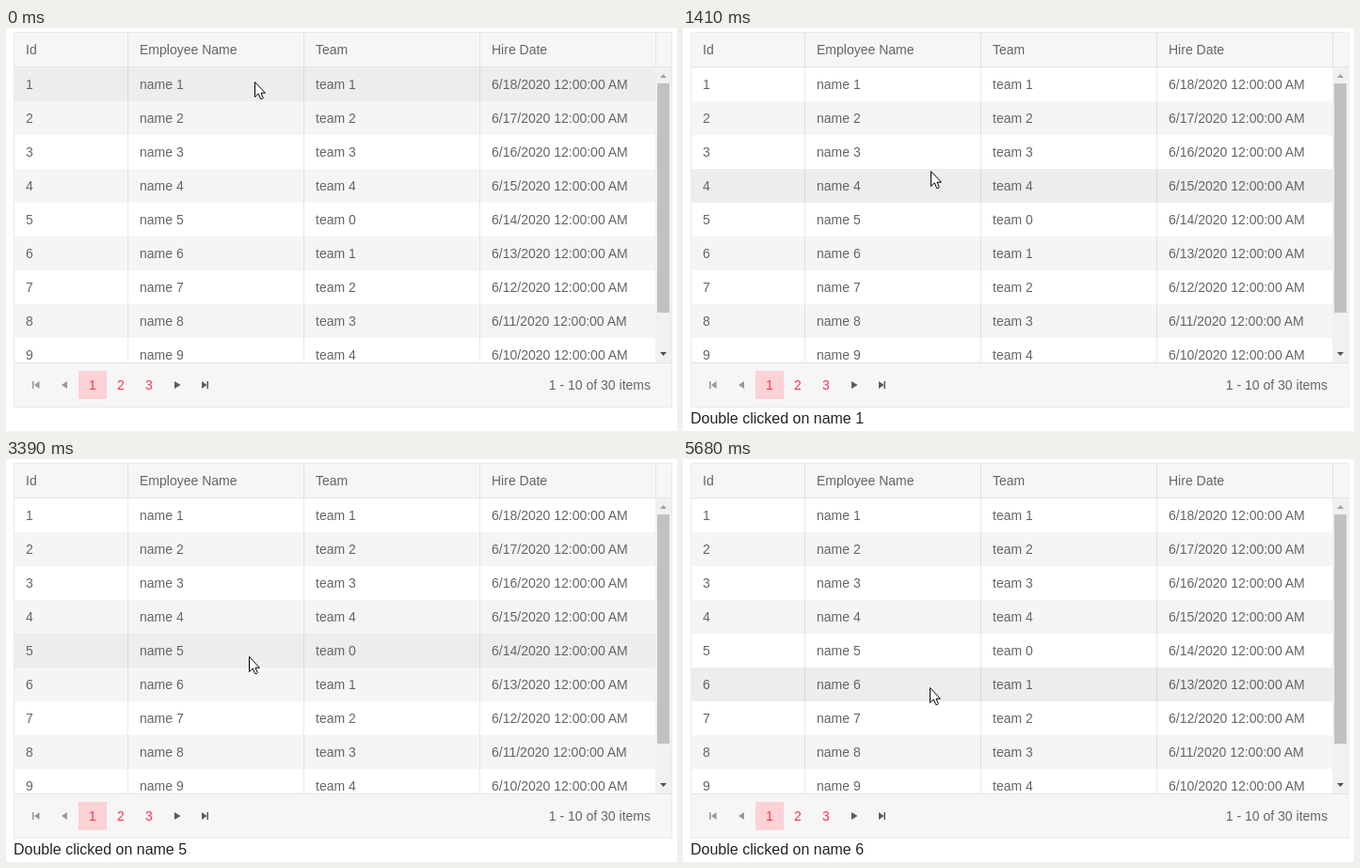
Animation of 713 by 429 pixels, one loop 7210 ms. Source, as an HTML page:

```html
<!DOCTYPE html>
<html lang="en">
<head>
<meta charset="utf-8">
<title>Grid double click</title>
<style>
  html, body { margin: 0; width: 100%; height: 100%; overflow: hidden; background: #fff; }
  svg { display: block; }
  text { font: 14px "Liberation Sans", Arial, sans-serif; fill: #656565; white-space: pre; }
  .page { fill: #ff3150; text-anchor: middle; }
  .info { text-anchor: end; }
  .line { fill: #000; fill-opacity: .08; }
  #message { font-size: 16px; fill: #212529; }
</style>
</head>
<body>
<svg width="713" height="429" viewBox="0 0 713 429">
  <defs><clipPath id="body"><rect x="9" y="42" width="681" height="314"/></clipPath></defs>
  <rect x="9" y="5" width="698" height="37" fill="#f6f6f6"/>
  <rect x="9" y="356" width="698" height="47" fill="#f6f6f6"/>
  <g id="rows" clip-path="url(#body)"></g>
  <g id="header"></g>
  <g id="lines"></g>

  <g id="scrollbar">
    <rect x="690" y="42" width="17" height="314" fill="#f1f1f1"/>
    <rect x="692" y="59" width="13" height="244" fill="#c1c1c1"/>
    <path d="M695 53h7l-3.5-4z" fill="#a3a3a3"/>
    <path d="M695 345h7l-3.5 4z" fill="#505050"/>
  </g>

  <g id="pager">
    <rect x="77" y="365" width="30" height="30" fill="#fbd2d5"/>
    <g fill="#5c5c5c">
      <path d="M28 376h1.5v8H28zM35.5 376v8l-5.5-4z" opacity=".6"/>
      <path d="M65 376v8l-6-4z" opacity=".6"/>
      <path d="M179 376v8l6.5-4z"/>
      <path d="M208 376v8l5.5-4zM213.5 376h1.5v8h-1.5z"/>
    </g>
    <text class="info" x="685" y="385">1 - 10 of 30 items</text>
  </g>

  <text id="message" x="8" y="421"></text>
  <g id="pointer">
    <path d="M.5.5V16.5L4.3 12.9 6.6 18.4H8.4L9.3 17.6 7 12.2H11.4Z" fill="#fff" stroke="#000"/>
    <circle id="click" r="12" fill="#ff0" fill-opacity=".47"/>
  </g>
</svg>
<script>
const LOOP = 7210, TICK = LOOP / 66, TICK_LEAD = 12;
const TOP = 42, ROW = 36;
const columns = [129, 316, 503, 690].map(right => right - 187);
columns[0] = 9;
const $ = id => document.getElementById(id);

const easeOut = power => u => 1 - (1 - u) ** power;
const smooth = u => u * u * (3 - 2 * u);

// Pointer strokes and double clicks are timed in ticks.
const home = { x: 264, y: 57 };
const strokes = [
  { from: 6, to: 9, x: 264, y: 93, ease: easeOut(1.4) },
  { from: 10, to: 12, x: 263, y: 113, ease: smooth },
  { from: 12, to: 14, x: 263, y: 161, ease: easeOut(2.4) },
  { from: 15, to: 17, x: 263, y: 166, ease: smooth },
  { from: 24, to: 27, x: 258, y: 210, ease: easeOut(2.4) },
  { from: 40, to: 47, x: 262, y: 243, ease: smooth }
];
const doubleClicks = [
  { press: 2, release: 3, report: 5 },
  { press: 18, release: 20, report: 20 },
  { press: 29, release: 31, report: 31 },
  { press: 50, release: 52, report: 52 }
];

function pointerAt(tick) {
  let { x, y } = home;
  for (const stroke of strokes) {
    const u = (tick - stroke.from) / (stroke.to - stroke.from);
    const progress = stroke.ease(Math.min(1, Math.max(0, u)));
    x += (stroke.x - x) * progress;
    y += (stroke.y - y) * progress;
  }
  return { x: Math.round(x), y: Math.round(y) };
}

const rowAt = tick => Math.floor((pointerAt(tick).y - TOP) / ROW);

function add(parent, tag, attributes, content = "") {
  const node = document.createElementNS("http://www.w3.org/2000/svg", tag);
  for (const key in attributes) node.setAttribute(key, attributes[key]);
  node.textContent = content;
  return $(parent).appendChild(node);
}

function addTexts(parent, labels, y) {
  labels.forEach((label, i) => add(parent, "text", { x: columns[i] + (i ? 13 : 12), y }, label));
}

const line = (x, y, width, height) => add("lines", "rect", { class: "line", x, y, width, height });

addTexts("header", ["Id", "Employee Name", "Team", "Hire Date"], 28);
const rows = [];
for (let i = 0; i < 9; i++) {
  const id = i + 1, y = TOP + i * ROW;
  rows.push(add("rows", "rect", { x: 9, y, width: 681, height: ROW }));
  addTexts("rows", [id, `name ${id}`, `team ${id % 5}`, `6/${18 - i}/2020 12:00:00 AM`], y + 23);
}
for (let page = 1; page <= 3; page++) {
  add("pager", "text", { class: "page", x: 62 + page * 30, y: 385 }, page);
}

columns.slice(1).forEach(x => line(x, 5, 1, 351));
line(690, 5, 1, 36);
[41, 356].forEach(y => line(9, y, 698, 1));
[4, 403].forEach(y => line(8, y, 700, 1));
[8, 707].forEach(x => line(x, 5, 1, 398));

function draw(now) {
  const tick = Math.floor((now % LOOP + TICK_LEAD) / TICK);
  const { x, y } = pointerAt(tick);
  const hovered = rowAt(tick);
  const pressed = doubleClicks.some(({ press, release }) => tick >= press && tick < release);
  const reported = doubleClicks.findLast(({ report }) => tick >= report);
  rows.forEach((row, i) => row.setAttribute("fill", i === hovered ? "#ededed" : i % 2 ? "#f5f5f5" : "#fff"));
  $("pointer").setAttribute("transform", `translate(${x} ${y})`);
  $("click").style.display = pressed ? "" : "none";
  $("message").textContent = reported ? `Double clicked on name ${rowAt(reported.report) + 1}` : "";
}

const start = performance.now();
function animate() {
  draw(performance.now() - start);
  requestAnimationFrame(animate);
}
animate();
</script>
</body>
</html>
```
